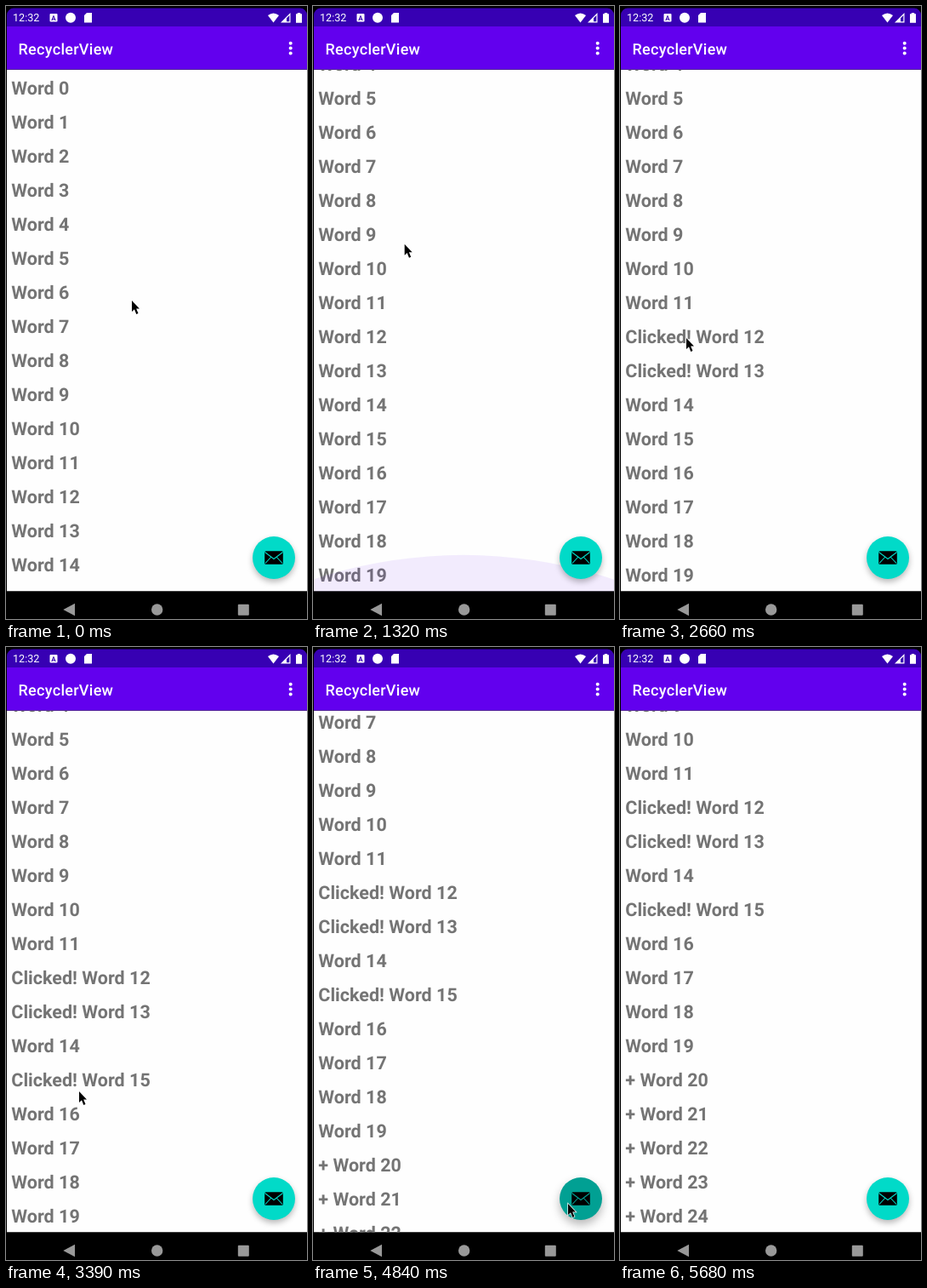
An HTML page with a canvas that plays this animation: 354x720 px, repeating every 6170 ms.

```html
<!DOCTYPE html>
<html lang="en">
<head>
<meta charset="utf-8">
<title>RecyclerView</title>
<style>
  html, body { margin: 0; width: 100%; height: 100%; overflow: hidden; background: #000; }
  canvas { display: block; }
</style>
</head>
<body>
<canvas id="stage" width="354" height="720"></canvas>
<script>
const ctx = document.getElementById('stage').getContext('2d');
ctx.textRendering = 'geometricPrecision';

const LOOP = 6170, STEP = 120.9;           // the screen refreshes in steps
const LIST_TOP = 74.6, LIST_BOTTOM = 687.6;
const ROW = 40, FIRST_ROWS = 20;
const LIST_END = 187.5;                    // scroll offset that shows the last row

const clickTime = { 13: 2170, 12: 2600, 15: 3380 };
const addTimes = [4000, 4240, 4780, 4960, 5270];

// Mouse journey: [from ms, to ms, x, y reached]
const legs = [
  [0, 605, 100, 565],
  [605, 1030, 110, 269],
  [1209, 1930, 76, 428],
  [2300, 2540, 78, 390],
  [2660, 3140, 64, 515],
  [3270, 3380, 86, 522],
  [3385, 3748, 346, 655],
  [3748, 3868, 300, 654],
  [5440, 5560, 300, 684],
  [5560, 5680, 300, 760]
];

const clamp01 = v => Math.max(0, Math.min(1, v));
const ease = (t, from, to) => (1 - Math.cos(Math.PI * clamp01((t - from) / (to - from)))) / 2;

function cursorAt(t) {
  let x = 148, y = 346;
  for (const [from, to, toX, toY] of legs) {
    const p = ease(t, from, to);
    x += (toX - x) * p;
    y += (toY - y) * p;
  }
  return { x, y };
}

function scrollAt(t) {
  if (t < 800) return 0;
  if (t < 1100) return Math.min(LIST_END, 516 - cursorAt(t).y);
  return addTimes.reduce((sum, add) => sum + ROW * ease(t, add, add + 110), LIST_END);
}

// Button press: full at first, then fading.
function pressAt(t) {
  const last = addTimes.filter(add => add <= t).pop();
  return last ? clamp01((240 - (t - last)) / 120) : 0;
}

function rect(color, x, y, w, h, radius = 0) {
  ctx.fillStyle = color;
  ctx.beginPath();
  ctx.roundRect(x, y, w, h, radius);
  ctx.fill();
}
function circle(color, x, y, r) {
  ctx.fillStyle = color;
  ctx.beginPath();
  ctx.arc(x, y, r, 0, 7);
  ctx.fill();
}
function shape(color, d) {
  ctx.fillStyle = color;
  ctx.fill(new Path2D(d));
}
function text(str, x, y, font, color, spacing = '0px') {
  ctx.font = font + ' Roboto, sans-serif';
  ctx.letterSpacing = spacing;
  ctx.fillStyle = color;
  ctx.fillText(str, x, y);
}
function insideList(draw) {
  ctx.save();
  ctx.beginPath();
  ctx.rect(1, LIST_TOP, 353, LIST_BOTTOM - LIST_TOP);
  ctx.clip();
  draw();
  ctx.restore();
}

function drawList(t) {
  const scroll = scrollAt(t);
  const rows = FIRST_ROWS + addTimes.filter(add => t >= add).length;
  rect('#fefefe', 1, LIST_TOP, 353, LIST_BOTTOM - LIST_TOP);
  for (let i = 0; i < rows; i++) {
    const prefix = i >= FIRST_ROWS ? '+ ' : t >= clickTime[i] ? 'Clicked! ' : '';
    text(prefix + 'Word ' + i, 6.3, 103.7 + i * ROW - scroll, 'bold 21.53px', '#747474');
  }
}

// Overscroll arc at the bottom of the list.
function drawGlow(t) {
  const strength = t < 950 ? 0 : clamp01((1930 - t) / 720);
  ctx.translate(177, LIST_BOTTOM);
  ctx.scale(1, .9 * strength);
  if (strength) circle(`rgba(98,0,238,${.09 * strength})`, 0, 368, 425);
}

function drawBars() {
  rect('#3700b3', 1, 2.6, 353, 30, [8, 8, 0, 0]);
  rect('#6200ee', 1, 24, 353, LIST_TOP - 24);
  text('RecyclerView', 14.6, 56.5, '500 18px', '#fff', '0.28px');
  for (let i = 0; i < 3; i++) circle('#fff', 334.7, 43.8 + 5.8 * i, 2);

  text('12:32', 8, 18.3, '12.6px', '#fff');
  rect('#fff', 51.5, 9, 9, 9.5, 1);
  text('A', 53.3, 16.7, 'bold 8px', '#3700b3');
  circle('#fff', 76, 13.8, 6);
  shape('#fff', 'M95 8H101V19.5H92V11Z');
  shape('#fff', 'M308 11Q314.5 6 321 11L314.5 19.5Z');
  shape('#fff', 'M334.5 8V19.5H323Z');
  shape('#3700b3', 'M333.3 11V18.3H330V14.3Z');
  shape('#fff', 'M342.8 8H346.2V9.3H348V19.8H341V9.3H342.8Z');

  shape('#999', 'M67.3 709L81 701.8V716.2Z');
  circle('#999', 177.7, 709, 6.7);
  rect('#999', 272.8, 702.7, 13, 13, 1);
}

function drawButton(press) {
  const mix = (a, b) => Math.round(a + (b - a) * press);
  const color = `rgb(1,${mix(218, 160)},${mix(200, 147)})`;
  insideList(() => {
    ctx.shadowColor = 'rgba(0,0,0,.28)';
    ctx.shadowBlur = 7 + 4 * press;
    ctx.shadowOffsetY = 3.5 + 2 * press;
    circle(color, 315, 648, 25);
  });
  rect('#000', 304.2, 640.3, 21.6, 15.4, 1.5);
  ctx.strokeStyle = color;
  ctx.lineWidth = 1.1;
  ctx.stroke(new Path2D('M304.5 641.5L315 649.5L325.5 641.5M305 654.5L311.5 647.5M325 654.5L318.500 647.5'));
}

function drawCursor({ x, y }) {
  const arrow = new Path2D('M0 0V13L3 10.3L5.3 16L7.5 15L5.2 9.5H9Z');
  ctx.save();
  ctx.translate(x, y);
  ctx.strokeStyle = '#fff';
  ctx.lineWidth = 1.4;
  ctx.stroke(arrow);
  ctx.fillStyle = '#000';
  ctx.fill(arrow);
  ctx.restore();
}

function frame() {
  const t = Math.floor((performance.now() % LOOP + 10) / STEP) * STEP;
  rect('#000', 0, 0, 354, 720);
  insideList(() => {
    drawList(t);
    drawGlow(t);
  });
  drawBars();
  drawButton(pressAt(t));
  drawCursor(cursorAt(t));
  requestAnimationFrame(frame);
}
frame();
</script>
</body>
</html>
```
